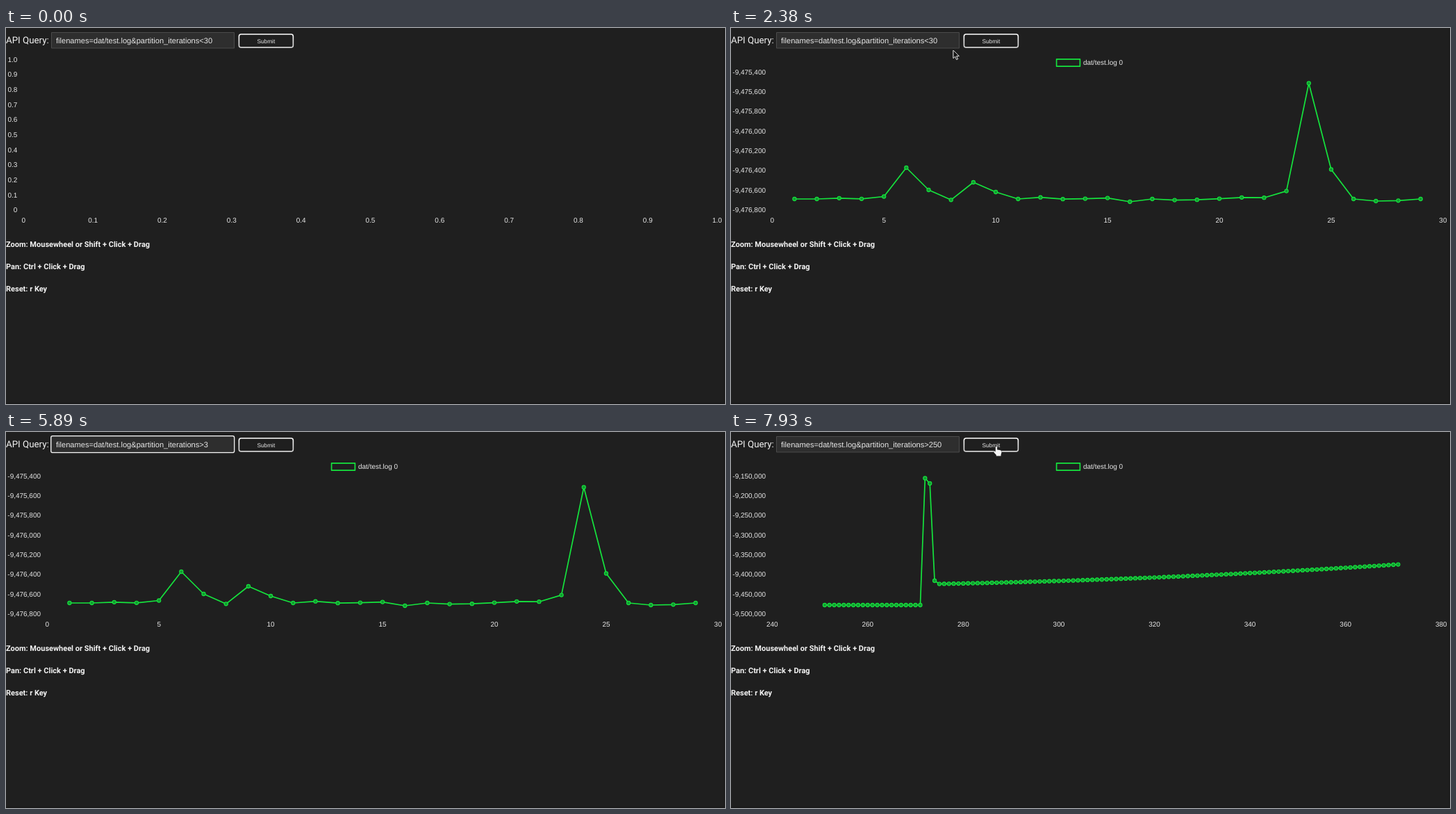
Recreate the animation shown at these times as an HTML page with a canvas. Size 1035 px wide and 541 px high, loop 8 s.

```html
<!DOCTYPE html>
<html lang="en">
<head>
<meta charset="utf-8">
<title>API Query</title>
<style>
html, body { margin: 0; width: 100%; height: 100%; overflow: hidden; background: #1f1f1f; }
canvas { display: block; }
</style>
</head>
<body>
<canvas id="stage" width="1035" height="541"></canvas>
<script>
const ctx = document.getElementById('stage').getContext('2d');
const LOOP = 8000;
const BG = '#1f1f1f', INK = '#e8e8e8', GREEN = '#15e33d';
const SANS = '"Liberation Sans", Arial, sans-serif';
const ROBOTO = 'Roboto, sans-serif';
const INPUT_FONT = '11.1px ' + SANS;
const TICK_FONT = '9.97px ' + SANS;
const QUERY = 'filenames=dat/test.log&partition_iterations';

// [start, text after the query stem, caret visible]
const typing = [
  [0, '<30', false], [2770, '<30', true], [3370, '<3', false], [3590, '<', false],
  [3770, '', false], [4010, '', true], [4250, '>', true], [4920, '>3', true],
  [5350, '>30', true], [5890, '>3', false], [6060, '>', false], [6300, '>2', true],
  [6650, '>25', true], [6790, '>250', true], [7510, '>250', false]
];

// [start, pointer shape, x, y]
const pointer = [
  [0, ''], [200, 'arrow', 565, 306], [270, 'arrow', 183, 0],
  [1090, 'beam', 232, 9], [1170, 'beam', 288, 15], [1250, 'hand', 340, 16], [1330, 'hand', 362, 15.5],
  [2220, 'hand', 374, 18], [2300, 'arrow', 346, 30], [2380, 'arrow', 320, 32],
  [2456, 'arrow', 312, 31], [2534, 'beam', 307, 25], [2613, 'beam', 305, 21], [2692, 'beam', 304.5, 19.5],
  [4920, ''], [7290, 'beam', 312, 20], [7363, 'hand', 345, 19], [7437, 'hand', 370, 20],
  [7510, 'hand', 382, 20.5]
];

const firstRun = [
  246, 246, 244.8, 245.8, 242.5, 201, 233, 247.3, 222, 236, 246, 243.7, 246.2, 245.6, 244.6,
  250, 246, 247.6, 247.2, 245.6, 243.8, 244.2, 234.6, 79.5, 203.5, 246, 249, 248.3, 246
].map((y, i) => [59.2 + (i + 1) * 32.19, y]);

const spike = [66.5, 74, 214];
const secondRun = Array.from({ length: 121 }, (_, i) => {
  const d = i - 24;
  const y = i < 21 ? 249 : i < 24 ? spike[i - 21] : 218.6 - 0.13 * d - 0.00169 * d * d;
  return [59.2 + (i + 11) * 6.879, y];
});

const at = (track, t) => track.findLast(step => step[0] <= t);
const within = (t, a, b) => t >= a && t < b;

function text(str, x, y, font, align = 'left', color = INK) {
  ctx.font = font;
  ctx.textAlign = align;
  ctx.fillStyle = color;
  ctx.fillText(str, x, y);
}

function box(x, y, w, h, r, stroke, width, fill) {
  ctx.beginPath();
  ctx.roundRect(x, y, w, h, r);
  if (fill) { ctx.fillStyle = fill; ctx.fill(); }
  ctx.strokeStyle = stroke;
  ctx.lineWidth = width;
  ctx.stroke();
}

function axes(xs, ys, x0, dx, y0, dy, labelRight) {
  ys.forEach((s, i) => text(s, labelRight, y0 + i * dy, TICK_FONT, 'right'));
  xs.forEach((s, i) => text(s, x0 + i * dx, 280, TICK_FONT, 'center'));
}

function series(points) {
  box(468.6, 44.8, 33.8, 10.4, 0, GREEN, 1.66);
  text('dat/test.log 0', 507, 53, TICK_FONT);
  ctx.beginPath();
  points.forEach(([x, y]) => ctx.lineTo(x, y));
  ctx.strokeStyle = GREEN;
  ctx.lineWidth = 1.7;
  ctx.lineJoin = 'round';
  ctx.stroke();
  ctx.fillStyle = '#129a31';
  ctx.lineWidth = 1.1;
  for (const [x, y] of points) {
    ctx.beginPath();
    ctx.arc(x, y, 2.6, 0, Math.PI * 2);
    ctx.fill();
    ctx.stroke();
  }
}

const range = (n, f) => Array.from({ length: n }, (_, i) => f(i));
const tenth = i => i === 0 ? '0' : (i / 10).toFixed(1);
const comma = n => n.toLocaleString('en-US');

function chart(t) {
  if (t < 1830) {
    axes(range(11, tenth), range(11, i => tenth(10 - i)), 25.3, 99.83, 48.5, 21.68, 16.3);
  } else if (t < 7930) {
    axes(range(7, i => i * 5), range(8, i => comma(-9475400 - i * 200)), 59.2, 160.95, 66.5, 28.36, 50);
    series(firstRun);
  } else {
    axes(range(8, i => 240 + i * 20), range(8, i => comma(-9150000 - i * 50000)), 59.2, 137.58, 66.5, 28.36, 50);
    series(secondRun);
  }
}

function form(t) {
  text('API Query:', 0, 22, '13.3px ' + ROBOTO, 'left', '#f4f4f4');
  box(65.5, 6.5, 263, 22.5, 0, '#4b4b4b', 1, '#2e2e2e');
  if (within(t, 2692, 7510)) box(64.7, 5.7, 264, 24, 2.5, '#f2f2f2', 1.3);

  const [, tail, caret] = at(typing, t);
  const value = QUERY + tail;
  text(value, 72, 22, INPUT_FONT);
  if (caret) {
    ctx.fillRect(Math.round(72 + ctx.measureText(value).width) - 0.5, 12, 1, 12.5);
  }

  const pressed = within(t, 1500, 1650) || within(t, 7510, 7670);
  const edge = ctx.createLinearGradient(0, 9, 0, 28);
  edge.addColorStop(0, pressed ? '#a8a8a8' : '#ffffff');
  edge.addColorStop(1, pressed ? '#ffffff' : '#d0d0d0');
  box(335.4, 9, 78, 18.9, 3, edge, 1.6, BG);
  text('Submit', 374.3, 21.9, '8.3px ' + SANS, 'center');
}

const shapes = {
  arrow: { d: new Path2D('M0 0V11.5L2.7 9L4.6 13.4L6.5 12.6L4.6 8.3H8.2Z'), fill: '#161616', line: '#d8d8d8' },
  beam: { d: new Path2D('M-3 -6.3H3V-4.9H.8V4.9H3V6.3H-3V4.9H-.8V-4.9H-3Z'), fill: '#f2f2f2', line: '#222' },
  hand: {
    d: new Path2D('M-1.2 1Q0 -.6 1.2 1V5L5 5.6Q7.8 6.2 7.6 8.5L6.6 12V14H-.2V12.4L-3.8 8.4Q-4 6.8 -2.4 7.2L-1.2 8.3Z'),
    fill: '#f6f6f6', line: '#1a1a1a'
  }
};

function drawPointer(t) {
  const [, name, x, y] = at(pointer, t);
  if (!name) return;
  const { d, fill, line } = shapes[name];
  ctx.save();
  ctx.translate(x, y);
  ctx.lineWidth = 0.9;
  ctx.strokeStyle = line;
  ctx.fillStyle = fill;
  ctx.stroke(d);
  ctx.fill(d);
  if (name === 'arrow') ctx.stroke(d);
  ctx.restore();
}

function draw(t) {
  ctx.fillStyle = BG;
  ctx.fillRect(0, 0, 1035, 541);
  ctx.fillStyle = '#191919';
  ctx.fillRect(1033.5, 0, 1.5, 541);
  ctx.fillRect(0, 539, 1035, 2);
  form(t);
  chart(t);
  ['Zoom: Mousewheel or Shift + Click + Drag', 'Pan: Ctrl + Click + Drag', 'Reset: r Key']
    .forEach((s, i) => text(s, 0, 314.8 + i * 32.1, 'bold 11px ' + ROBOTO, 'left', '#f4f4f4'));
  drawPointer(t);
}

ctx.textRendering = 'geometricPrecision';
const start = performance.now();
function frame() {
  draw((performance.now() - start) % LOOP);
  requestAnimationFrame(frame);
}
frame();
</script>
</body>
</html>
```
